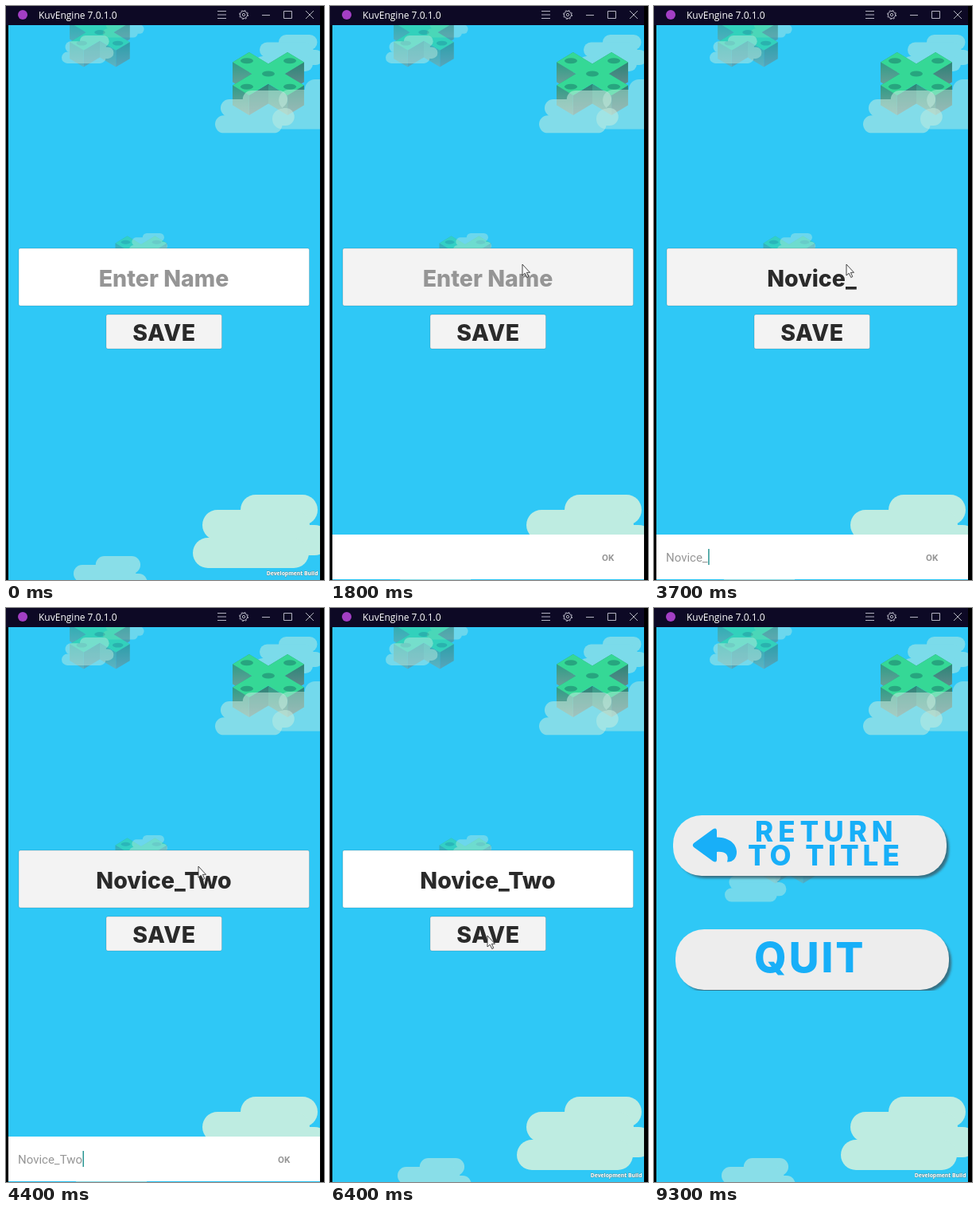
An HTML page for the animation above (9800 ms loop, 400x720 px).

```html
<!DOCTYPE html>
<html lang="en">
<head>
<meta charset="utf-8">
<title>Name entry</title>
<style>
  html, body { margin: 0; width: 100%; height: 100%; overflow: hidden; background: #000; }
  svg { display: block; }
  text { font-optical-sizing: none; }
  .heavy { font: 800 28.5px Inter, sans-serif; fill: #2a2a2a; text-anchor: middle; }
  .menu { font: 800 35px Inter, sans-serif; fill: #18aff8; }
  .bar { font: 15px Roboto, sans-serif; fill: #969696; }
  .box { stroke: #000; stroke-opacity: .14; fill: #f3f3f3; }
  .icon { fill: none; stroke: #b4b3c2; }
</style>
</head>
<body>
<svg width="400" height="720" viewBox="0 0 400 720">
  <defs>
    <linearGradient id="left" x2="0" y2="1"><stop stop-color="#2f9c86"/><stop offset="1" stop-color="#7fa3a0"/></linearGradient>
    <linearGradient id="right" x2="0" y2="1"><stop stop-color="#2b8577"/><stop offset="1" stop-color="#748f95"/></linearGradient>
    <g id="cloud" fill="#c6eee0">
      <rect x="60" width="97" height="38" rx="19"/>
      <rect x="12" y="19" width="135" height="38" rx="19"/>
      <rect x="95" y="38" width="77" height="38" rx="19"/>
      <rect y="54" width="146" height="38" rx="19"/>
      <rect x="40" y="38" width="90" height="30"/>
    </g>
    <filter id="soft" x="-10%" y="-20%" width="120%" height="140%"><feGaussianBlur stdDeviation="1.5"/></filter>
    <g id="plate">
      <rect x="5" y="5" width="342" height="74" rx="35" fill="#38525e" opacity=".75" filter="url(#soft)"/>
      <rect width="344" height="76" rx="36" fill="#ededed"/>
    </g>
  </defs>

  <rect width="395" height="24" fill="#0d0925"/>
  <circle cx="21" cy="11" r="6" fill="#a33fc4"/>
  <text x="41" y="15.500" fill="#fff" style="font:500 12px 'Open Sans',sans-serif">KuvEngine 7.0.1.0</text>
  <path class="icon" d="M266 6.500h11M266 11h11M266 15.500h11M322 11.500h10M349.500 6.500h10v9h-10ZM377 6l10 10M387 6l-10 10"/>
  <circle class="icon" cx="299" cy="11" r="4.500"/>
  <circle class="icon" cx="299" cy="11" r="5.500" stroke-dasharray="2.200 2.120"/>
  <circle class="icon" cx="299" cy="11" r="1.700"/>

  <svg x="3" y="24" width="392" height="696" viewBox="3 24 392 696">
    <rect x="3" y="24" width="392" height="696" fill="#2fc8f6"/>
    <g id="sky"></g>
    <text x="392.500" y="714" text-anchor="end" fill="#fff" stroke="#5d8f98" stroke-width=".8" paint-order="stroke"
          style="font:700 6.800px 'Open Sans',sans-serif">Development Build</text>

    <g id="form">
      <rect id="field" class="box" x="16" y="304" width="365.500" height="72" rx="2"/>
      <text id="fieldText" class="heavy" x="198.500" y="351.500"></text>
      <rect class="box" x="126" y="387" width="145.500" height="43" rx="2"/>
      <text class="heavy" x="199" y="419.500" letter-spacing=".6">SAVE</text>
    </g>

    <g id="menu">
      <use href="#plate" x="24" y="260"/>
      <path fill="#18aff8" d="M50 295 74 277.500Q79 274.500 79 280V287.500C96 288 104 297 104 306 104 314 99 319 92 318.500 95 309 89 305 79 306V315Q79 320.500 74 317.500L50 300Q47.500 297.500 50 295Z"/>
      <text class="menu" x="127" y="293" letter-spacing="6">RETURN</text>
      <text class="menu" x="118" y="323" letter-spacing="5">TO TITLE</text>
      <svg x="27" y="403" width="352" height="77"><use href="#plate"/></svg>
      <text class="menu" x="126" y="457" letter-spacing="3" style="font-size:52px">QUIT</text>
    </g>

    <g id="keyboard">
      <rect x="3" y="663" width="392" height="56" fill="#fff"/>
      <text id="typed" class="bar" x="15" y="697"></text>
      <rect id="caret" y="681" width="1.500" height="20"/>
      <text class="bar" x="342" y="696" style="font-size:11.500px;font-weight:700">OK</text>
    </g>
    <path id="cursor" d="M0 0V14L3.200 11.200 5.800 16.500 7.800 15.500 5.400 10.300H9.500Z" fill="#fafafa" stroke="#333" stroke-width=".9"/>
  </svg>
</svg>
<script>
const LOOP = 9800, NAME = 'Novice_Two';
const $ = id => document.getElementById(id);

// An isometric cross: outline, walls sorted back to front, then the top with its pits.
function crossIsland() {
  const HALF = .9, ARM = 3, DEPTH = 25;
  const iso = ([u, v]) => [(u - v) * 11.5, (u + v) * 6.9];
  const turns = [0, 1, 2, 3].map(n => ([u, v]) => {
    for (let i = 0; i < n; i++) [u, v] = [-v, u];
    return iso([u, v]);
  });
  const outline = turns.flatMap(turn => [[HALF, -HALF], [ARM, -HALF], [ARM, HALF]].map(turn));
  const walls = outline.map((p, i) => [p, outline[(i + 1) % outline.length]])
    .sort(([a, b], [c, d]) => a[1] + b[1] - c[1] - d[1])
    .map(([[x, y], [x2, y2]]) => {
      const side = (x2 - x) * (y2 - y) > 0 ? 'left' : 'right';
      return `<path fill="url(#${side})" d="M${x} ${y}V${y + DEPTH}L${x2} ${y2 + DEPTH}V${y2}Z"/>`;
    });
  const pits = [iso([0, 0]), ...turns.map(turn => turn([2.35, 0]))]
    .map(([x, y]) => `<ellipse cx="${x}" cy="${y}" rx="8" ry="3.500" fill="#27a57f"/>`);
  return walls.join('') + `<path fill="#35d896" d="M${outline.join('L')}Z"/>` + pits.join('');
}

const place = (body, x, y, scale, opacity) =>
  `<g transform="translate(${x} ${y}) scale(${scale})" opacity="${opacity}">${body}</g>`;
const cloud = (...spot) => place('<use href="#cloud"/>', ...spot);
const island = (...spot) => place(crossIsland(), ...spot);

$('sky').innerHTML =
  cloud(122, 12, .3, .4) + island(118, 33, .84, .6) + cloud(70, 37, .38, .45) +
  cloud(313, 36, .5, .5) + island(330, 85, 1, 1) + cloud(335, 92, .68, .45) + cloud(263, 106, .58, .55) +
  island(170, 308, .72, .5) + cloud(155, 285, .28, .4) + cloud(89, 327, .45, .45) +
  cloud(235, 613, 1, .95) + cloud(78, 690, .58, .6);

// Cursor stops: time, x, y
const STOPS = [
  [100, 396, 150], [1000, 242, 324], [4900, 242, 324], [5800, 342, 670],
  [6100, 342, 670], [6400, 198, 411], [7900, 198, 411], [8400, 215, 724],
];
const smooth = p => p * p * (3 - 2 * p);
const ramp = (t, from, to) => Math.min(1, Math.max(0, (t - from) / (to - from)));
const show = (id, on) => $(id).style.display = on ? '' : 'none';

function cursorAt(t) {
  const next = STOPS.findIndex(stop => stop[0] > t);
  if (next < 1) return null;
  const [t0, x0, y0] = STOPS[next - 1], [t1, x1, y1] = STOPS[next];
  const p = smooth((t - t0) / (t1 - t0));
  return [x0 + (x1 - x0) * p, y0 + (y1 - y0) * p];
}

function render(t) {
  const count = Math.max(0, Math.floor((t - 2200) / 225) + 1);
  const text = NAME.slice(0, count);
  $('fieldText').textContent = text || 'Enter Name';
  $('fieldText').style.fill = text ? '' : '#959595';
  $('field').style.fill = t >= 900 && t < 6300 ? '#f3f3f3' : '#fff';

  const opened = ramp(t, 1400, 1600) - ramp(t, 6000, 6300);
  show('keyboard', opened > 0);
  $('keyboard').setAttribute('transform', `translate(0 ${(1 - opened) * 57})`);
  $('typed').textContent = text;
  const atStart = t >= 5900;
  show('caret', text);
  $('caret').setAttribute('x', atStart ? 15 : 15.5 + (text ? $('typed').getComputedTextLength() : 0));
  $('caret').setAttribute('fill', atStart ? '#555' : '#2a9693');

  show('form', t < 7100);
  show('menu', t >= 7100);

  const cursor = cursorAt(t);
  show('cursor', cursor);
  if (cursor) $('cursor').setAttribute('transform', `translate(${cursor})`);
}

function tick() {
  render(Math.floor(performance.now() % LOOP / 100) * 100);
  requestAnimationFrame(tick);
}
tick();
</script>
</body>
</html>
```
